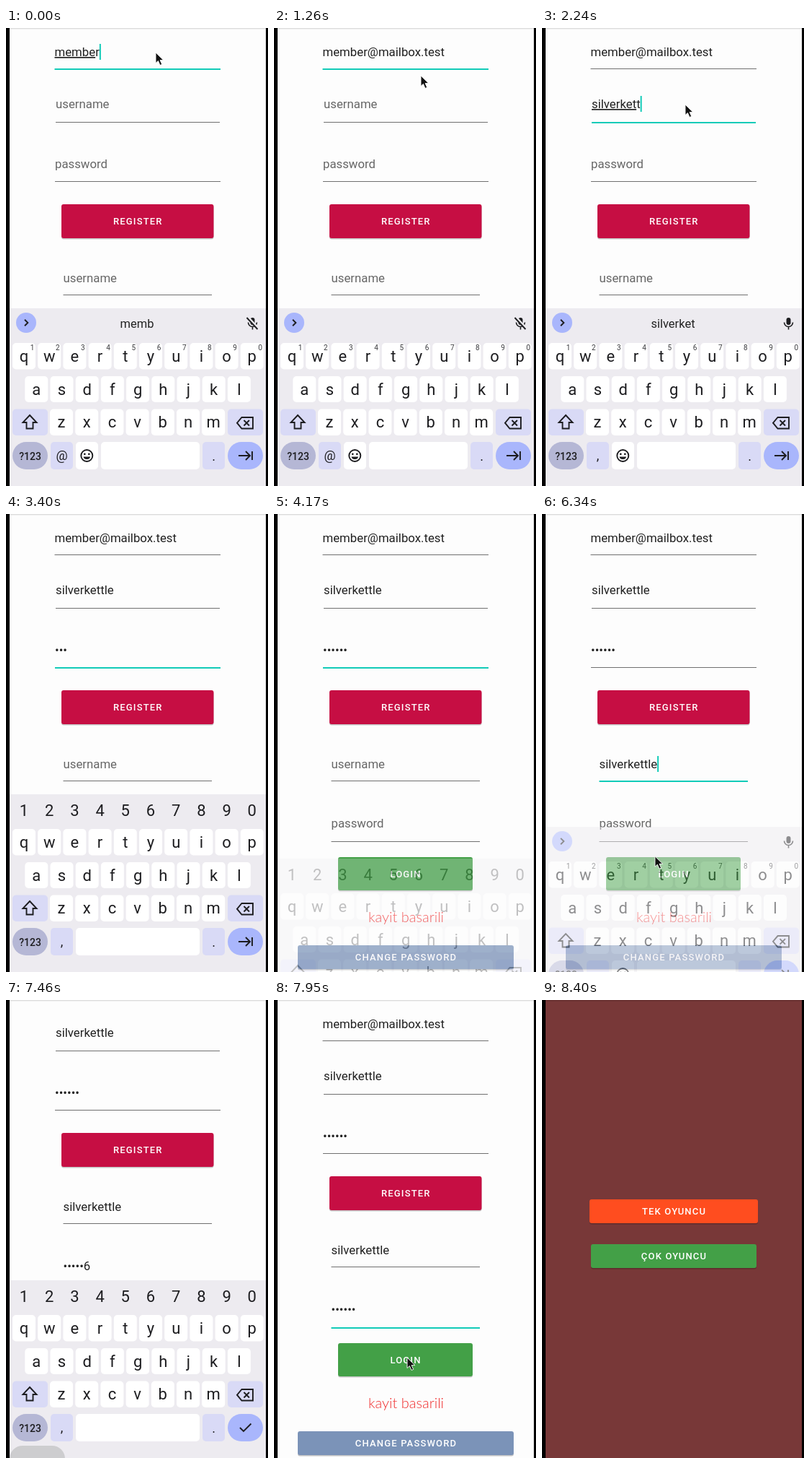
An HTML page for the animation above (8570 ms loop, 364 by 634 pixels).

```html
<!DOCTYPE html>
<html lang="en">
<head>
<meta charset="utf-8">
<title>Register and log in</title>
<style>
  html, body { margin: 0; width: 100%; height: 100%; overflow: hidden; background: #000; }
  svg { display: block; width: 100%; height: 100%; }
  text { font-family: Roboto, "Open Sans", sans-serif; }
  .caps { font-size: 13px; font-weight: 500; letter-spacing: .09em; fill: #fff; text-anchor: middle; }
  .key { font-size: 22px; fill: #1d1d20; text-anchor: middle; }
  .tip { font-size: 10px; fill: #3a3a3e; text-anchor: middle; }
  .word { font-size: 16.5px; fill: #222; text-anchor: middle; }
  .field { font-size: 16.8px; }
  .note { font: 300 20px Lato, sans-serif; fill: #f02a2a; text-anchor: middle; }
  .icon { fill: none; stroke: #1d1d20; stroke-width: 1.9; }
  .under { text-decoration: underline; text-decoration-thickness: 1px; }
</style>
</head>
<body>
<svg id="stage" viewBox="0 0 364 634"></svg>
<script>
const LOOP = 8570;
const MAIL = 'member@mailbox.test';
const USER = 'silverkettle';
const TEAL = '#12cbb8', PALE = '#d9daf6', BLUE = '#a9b6fc', GREEN = '#43a047';

const stage = document.getElementById('stage');

function add(parent, tag, attrs, content) {
  const node = document.createElementNS('http://www.w3.org/2000/svg', tag);
  for (const k in attrs) node.setAttribute(k, attrs[k]);
  if (content !== undefined) node.textContent = content;
  parent.append(node);
  return node;
}
const group = parent => add(parent, 'g', {});
const box = (parent, x, y, width, height, fill, rx = 0) =>
  add(parent, 'rect', { x, y, width, height, fill, rx });
const label = (parent, cls, x, y, content) =>
  add(parent, 'text', { class: cls, x, y }, content);
const icon = (parent, d) => add(parent, 'path', { class: 'icon', d });
const show = (node, on) => node.setAttribute('visibility', on ? 'inherit' : 'hidden');

function button(parent, x, y, w, h, fill, content) {
  box(parent, x, y + 1.5, w, h, 'rgba(0,0,0,.22)', 3);
  box(parent, x, y, w, h, fill, 3);
  label(parent, 'caps', x + w / 2 + .5, y + h / 2 + 4.6, content);
}

// Linear interpolation through rows of [time, value, ...]
function track(rows, t, col = 1) {
  if (t <= rows[0][0]) return rows[0][col];
  for (let i = 1; i < rows.length; i++) {
    const a = rows[i - 1], b = rows[i];
    if (t < b[0]) return a[col] + (b[col] - a[col]) * (t - a[0]) / (b[0] - a[0]);
  }
  return rows[rows.length - 1][col];
}

// Form
box(stage, 5, 0, 356, 634, '#fdfdfd');
const form = group(stage);

const fields = [
  { x: 67.5, y: 39, line: 56, x2: 298, hint: 'email', text: MAIL, start: -400, step: 80, lag: 2 },
  { x: 69, y: 111, line: 130, x2: 297, hint: 'username', text: USER, start: 1560, step: 72, lag: 1 },
  { x: 68, y: 194, line: 212, x2: 298, hint: 'password', text: '123456', start: 2950, step: 160, mask: true },
  { x: 79.5, y: 352, line: 369, x2: 286, hint: 'username', text: USER, start: 5130, step: 62, lag: 2 },
  { x: 79.5, y: 434, line: 453, x2: 286, hint: 'password', text: '123456', start: 6890, step: 110, mask: true }
];
for (const f of fields) {
  f.rule = box(form, f.x, f.line, f.x2 - f.x, 1, '#707070');
  f.node = label(form, 'field', f.x, f.y);
  f.under = add(f.node, 'tspan', { class: 'under' });
  f.plain = add(f.node, 'tspan', {});
  f.caret = box(form, 0, f.y - 17, 2, 22, TEAL);
}
button(form, 77, 244, 211.5, 47, '#c60e43', 'REGISTER');
button(form, 89, 475, 187, 46, GREEN, 'LOGIN');
label(form, 'note', 183.5, 565, 'kayit basarili');
button(form, 33, 597, 300, 33, '#7b93b8', 'CHANGE PASSWORD');
box(stage, 5, 0, 356, 1.5, '#dedede');

// Keyboard
const board = group(stage);
box(board, 5, 388, 356, 260, '#edebf0');
const PITCH = 35.2;

const digits = group(board), tips = group(board), tools = group(board);
[...'1234567890'].forEach((d, i) => {
  label(digits, 'key', 25 + i * PITCH, 417.5, d);
  label(tips, 'tip', 36.5 + i * PITCH, 446, d);
});
function row(letters, x, y, h) {
  [...letters].forEach((c, i) => {
    const cx = x + i * PITCH;
    board.insertBefore(box(board, cx - 16, y, 32, h, '#fff', 5), tips);
    label(board, 'key', cx, y + 25.5, c);
  });
}
row('qwertyuiop', 25, 436, 36.5);
row('asdfghjkl', 42.3, 482, 36);
row('zxcvbnm', 77, 527.5, 36.5);

box(board, 9, 527.5, 49, 36.5, PALE, 5);
icon(board, 'M33 536l-9.5 10h5v8.5h9V546h5z');
box(board, 308, 527.5, 49, 36.5, PALE, 5);
icon(board, 'M327.5 539H343v15.500h-15.500L321 546.700zM330.500 543l7.500 7.500m0-7.500l-7.500 7.500');

box(board, 9, 573, 49, 38, '#b5b7d5', 19);
label(board, 'key', 33.5, 597.5, '?123').style.cssText = 'font-size:14px;font-weight:500';
box(board, 62, 573, 31, 38, PALE, 5);
const comma = label(board, 'key', 77.5, 598, ',');
comma.style.fontSize = '18px';
const space = box(board, 132, 573, 137, 38, '#fff', 5);
const smiley = group(board);
box(smiley, 97, 573, 31, 38, '#fff', 5);
add(smiley, 'circle', { class: 'icon', cx: 112.3, cy: 592, r: 8 });
for (const cx of [109.3, 115.3]) add(smiley, 'circle', { cx, cy: 589.8, r: 1.4, fill: '#1d1d20' });
add(smiley, 'path', { d: 'M107.500 593.500h9.600a4.900 4.500 0 0 1-9.600 0z', fill: '#1d1d20' });
box(board, 273, 573, 31, 38, PALE, 5);
label(board, 'key', 288.5, 599, '.').style.fontSize = '18px';
box(board, 308, 573, 49, 38, BLUE, 19);
const next = icon(board, 'M323 592h16m-6-6l6 6-6 6M342 586v12');
const done = icon(board, 'M325 592l5 5 10.500-10.500');

// Suggestion bar
add(tools, 'circle', { cx: 28, cy: 408, r: 14, fill: BLUE });
icon(tools, 'M26 403.800l4.300 4.200-4.300 4.200');
box(tools, 339.500, 401, 6, 10, '#1d1d20', 3);
icon(tools, 'M336.500 407.500a6 6 0 0 0 12 0M342.500 413.500v4').style.strokeWidth = 1.6;
const slash = group(tools);
icon(slash, 'M335.500 400l15 16.500').style.cssText = 'stroke:#edebf0;stroke-width:4';
icon(slash, 'M334.500 401l15 16');
const words = [84, 182, 279.5].map(x => label(tools, 'word', x, 415));
const bars = group(tools);
for (const x of [130, 234]) box(bars, x, 398, 1, 21, '#cbcad0');

const blob = box(stage, 5, 617, 77, 40, '#cdcdcf', 18);

// Second screen
const menu = group(stage);
box(menu, 5, 0, 356, 634, '#783838');
box(menu, 5, 0, 356, 2, '#6a3232');
button(menu, 66, 276, 234, 33, '#ff4d1f', 'TEK OYUNCU');
button(menu, 68, 338, 230, 33, GREEN, 'ÇOK OYUNCU');

const mouse = add(stage, 'path', {
  d: 'M0 0v14.500l3.400-3 2.600 6 2.700-1.200-2.600-5.700h4.700z',
  fill: '#111', stroke: '#fff', 'stroke-width': .9
});
box(stage, 0, 0, 5, 634, '#000');
box(stage, 361, 0, 3, 634, '#000');

// Motion tables
const HIDE = [[4039, 0], [4219, 1], [4860, 1], [5040, 0], [6250, 0], [6430, 1],
  [6620, 1], [6800, 0], [7590, 0], [7770, 1]];
const PAN = [[6620, 0], [6800, -60], [7590, -60], [7770, 0]];
const FOCUS = [1440, 2740, 4840, 6600];
const POINTER = [[1150, 208, 34], [1400, 199, 106], [2450, 199, 106], [2700, 150, 180],
  [4400, 150, 186], [4520, 205, 262], [4620, 205, 262], [4800, 190, 346], [5850, 190, 346],
  [6150, 170, 470], [6340, 157, 474], [6540, 150, 428], [7780, 150, 430], [7930, 185, 495]];
const POINTER_ON = [[0, 2950], [4400, 5130], [5850, 6890], [7780, 8120]];
const FADE = [[8080, 0], [8330, 1]];

function drawField(f, t, focused) {
  const count = Math.max(0, Math.min(f.text.length, Math.floor((t - f.start) / f.step) + 1));
  const last = f.start + (f.text.length - 1) * f.step;
  const complete = count === f.text.length;
  let shown = f.text.slice(0, count);
  if (f.mask && count) {
    const fresh = t - (f.start + (count - 1) * f.step) < 110;
    shown = '•'.repeat(count - 1) + (fresh ? shown[count - 1] : '•');
  }
  const marked = focused && !f.mask && !complete ? Math.max(0, count - 1) : 0;
  f.under.textContent = shown.slice(0, marked);
  f.plain.textContent = count ? shown.slice(marked) : f.hint;
  f.node.setAttribute('fill', count ? '#202020' : '#666');
  f.rule.setAttribute('fill', focused ? TEAL : '#707070');
  f.rule.setAttribute('height', focused ? 2 : 1);

  const blink = t < last || Math.floor((t - last) / 220) % 2 === 0;
  show(f.caret, focused && !f.mask && blink);
  f.caret.setAttribute('x', f.x + (count ? f.node.getComputedTextLength() : 0));
  return complete ? 0 : count;
}

function drawBoard(t, focus, count) {
  const f = fields[focus], secret = !!f.mask;
  const away = track(HIDE, t);
  board.setAttribute('transform', `translate(0 ${157 * away ** 1.83})`);
  board.setAttribute('opacity', 1 - away);
  show(digits, secret);
  show(tips, !secret);
  show(tools, !secret);
  show(smiley, !secret);
  show(slash, !secret && focus === 0);
  space.setAttribute('x', secret ? 97 : 132);
  space.setAttribute('width', secret ? 172 : 137);
  comma.textContent = focus ? ',' : '@';
  show(next, focus < 4);
  show(done, focus === 4);

  const guess = secret ? '' : f.text.slice(0, Math.max(0, count - f.lag));
  const three = focus === 3 && guess !== '';
  const line = three ? [guess, USER, guess.toUpperCase()] : ['', guess, ''];
  words.forEach((w, i) => { w.textContent = line[i]; });
  show(bars, three);
}

function draw(t) {
  const focus = FOCUS.filter(at => t >= at).length;
  const counts = fields.map((f, i) => drawField(f, t, i === focus));
  form.setAttribute('transform', `translate(0 ${track(PAN, t)})`);
  drawBoard(t, focus, counts[focus]);
  show(blob, t >= 7380 && t < 7560);
  menu.setAttribute('opacity', track(FADE, t));
  mouse.setAttribute('transform', `translate(${track(POINTER, t)} ${track(POINTER, t, 2)})`);
  show(mouse, POINTER_ON.some(([from, to]) => t >= from && t < to));
}

const begin = performance.now();
function tick() {
  draw((performance.now() - begin) % LOOP);
  requestAnimationFrame(tick);
}
tick();
</script>
</body>
</html>
```
